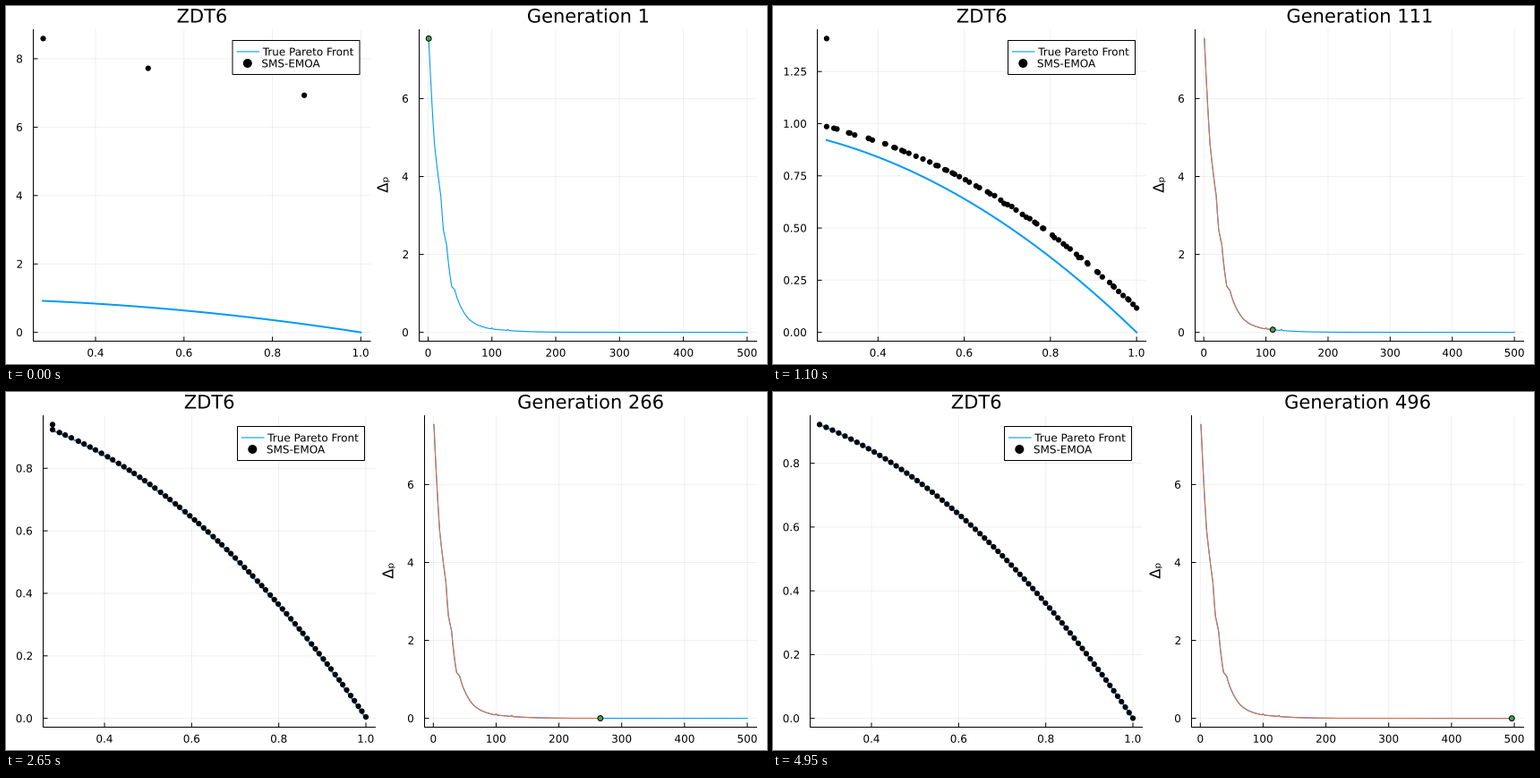
These frames come from a looping animation (850 px wide and 400 px high, 5000 ms). A matplotlib script:

```python
import math

import matplotlib
import matplotlib.pyplot as plt
import numpy as np
from matplotlib.animation import FuncAnimation
from matplotlib.patches import Circle, PathPatch, Rectangle
from matplotlib.textpath import TextPath
from matplotlib.transforms import Affine2D

matplotlib.rcParams["font.family"] = "DejaVu Sans"

W, H, DPI = 850, 400, 100
FRAMES, INTERVAL = 100, 50
PX = 72 / DPI
BLUE, ORANGE, GREEN = "#009AFA", "#E36F47", "#3DA44D"
TOP, BOTTOM, RIGHT = 26.5, 374.5, 838.5
X_MIN = 0.2808

# Panel edges, indexed by the number of decimals in the left tick labels.
LEFT_X0 = [30.5, 41.5, 49.5]
LEFT_X1 = [407, 412.5, 416.5]
RIGHT_X0 = [461.5, 467.5, 471.5]


def indicator_curve():
    """Roughly exponential decay through key points, with two late blips."""
    gen, value = zip((1, 7.54), (10, 4.83), (20, 3.5), (24, 2.63), (29, 2.25),
                     (37, 1.18), (42, 1.08), (46, 0.86), (64, 0.34),
                     (75, 0.21), (98, 0.09), (111, 0.069), (150, 0.025),
                     (216, 0.004), (500, 0.0003))
    curve = np.exp(np.interp(GENS, gen, np.log(value)))
    for blip in (100, 125):
        curve += 0.03 * np.exp(-(GENS - blip) ** 2.0)
    return curve


GENS = np.arange(1, 501)
INDICATOR = indicator_curve()

# A straggler above the front: (first generation, its height).
STRAGGLER = [(1, 0), (51, 1.95), (66, 1.7), (86, 1.5), (101, 1.408),
             (121, 1.05), (151, 0.955), (196, 0.976), (241, 0.94), (281, 0)]


def settled_x(u):
    """Spacing of a converged population: denser where the front is steep."""
    p = 1.44
    a = X_MIN ** p
    return (a + (1 - a) * np.clip(u, 0, 1)) ** (1 / p)


def along(values, n):
    return np.interp(np.linspace(0, 1, n), np.linspace(0, 1, len(values)),
                     values)


# Stages of the population: generation, x, and distance from the front
# relative to the indicator.
RNG = np.random.default_rng(4)
N = 68
U = np.linspace(0, 1, N)
PHASE = RNG.uniform(0, 2 * math.pi, N)
STAGES = [
    (1, [0.2815, 0.519, 0.872], [1.008, 0.896, 0.801]),
    (46, np.append([X_MIN] * 6, along([0.296, 0.574, 0.63, 0.757, 0.903, 1], 12)),
     np.append(np.linspace(1.24, 0.93, 6), [0.89] * 12)),
    (111, np.sort(settled_x(U + RNG.normal(0, 0.006, N))),
     0.87 + 0.16 * np.sin(math.pi * U) + RNG.normal(0, 0.02, N)),
    (216, settled_x(U), np.full(N, 0.9)),
]
CHURN = [0.02, 0.02, 0.003]


def moving_population(gen):
    i = sum(gen >= stage[0] for stage in STAGES[1:-1])
    (g0, x0, r0), (g1, x1, r1) = STAGES[i:i + 2]
    s = (gen - g0) / (g1 - g0)
    n = round(len(x0) + s * (len(x1) - len(x0)))
    rng = np.random.default_rng(gen)
    churn = CHURN[i] * math.sin(math.pi * s)
    x = (1 - s) * along(x0, n) + s * along(x1, n) + rng.normal(0, churn, n)
    r = (1 - s) * along(r0, n) + s * along(r1, n) + rng.normal(0, churn, n)
    return np.sort(np.clip(x, X_MIN, 1)), r


def settled_population(gen):
    wobble = 0.12 * math.exp((216 - gen) / 90) / N * np.sin(gen * 0.11 + PHASE)
    wobble[[0, -1]] = 0
    return settled_x(U + wobble), STAGES[-1][2]


def population(gen):
    x, r = moving_population(gen) if gen < 216 else settled_population(gen)
    g = 1 + r * INDICATOR[gen - 1]
    y = np.sort(g - x * x / g)[::-1]
    height = [h for start, h in STRAGGLER if start <= gen][-1]
    if height > y[0]:
        x, y = np.append(x, X_MIN), np.append(y, height)
    return x, y


def tick_count(top, step):
    return int(1.03 * top / step + 1e-9) + 1


def nice_step(top):
    """Step with the best mix of count, roundness and coverage."""
    best, best_score = 1, -1
    for mag in (0.1, 1):
        for q, nice in ((1, 1), (5, 0.9), (2.5, 0.5), (2, 0.7), (3, 0.2)):
            step = q * mag
            count = tick_count(top, step)
            if not 4 <= count <= 8:
                continue
            score = round(0.25 * (1 - abs(count - 5) / 5) + 0.25 * nice
                          + 0.2 * (count - 1) * step / (1.06 * top), 6)
            if score > best_score:
                best, best_score = step, score
    return best


def decimals(step):
    return next(d for d in range(4) if abs(round(step, d) - step) < 1e-9)


def scale(lo, hi, p0, p1):
    """Map data to pixels with a 3 % margin on both sides."""
    pad = 0.03 * (hi - lo)
    k = (p1 - p0) / (hi - lo + 2 * pad)
    return lambda v: p0 + (np.asarray(v) - lo + pad) * k


fig = plt.figure(figsize=(W / DPI, H / DPI), dpi=DPI, facecolor="white")
ax = fig.add_axes([0, 0, 1, 1])
outlines = {}


def line(x, y, color="black", width=1.0, z=2, **kw):
    ax.plot(x, y, color=color, lw=width * PX, zorder=z, snap=False, **kw)


def glyphs(text, size):
    """Unhinted outline of the text and its horizontal extent."""
    if (text, size) not in outlines:
        path = TextPath((0, 0), text, size=size)
        outlines[text, size] = path, path.get_extents()
    return outlines[text, size]


def add_text(path, move):
    ax.add_artist(PathPatch(path.transformed(move), fc="black", lw=0, zorder=9))


def label(x, y, text, size=12, ha="center"):
    """Text whose capitals are centred on y."""
    path, box = glyphs(text, size)
    anchor = {"left": box.x0, "center": (box.x0 + box.x1) / 2,
              "right": box.x1}[ha]
    add_text(path, Affine2D().translate(-anchor, 0).scale(1, -1)
             .translate(x, y + 0.365 * size))


def upright_label(x, y, text, size):
    path, box = glyphs(text, size)
    add_text(path, Affine2D().translate(-(box.x0 + box.x1) / 2,
                                        -(box.y0 + box.y1) / 2)
             .rotate_deg(90).scale(1, -1).translate(x, y))


def dot(x, y, radius, color="black", edge=0, z=4):
    ax.add_artist(Circle((x, y), radius, fc=color, ec="black", lw=edge * PX,
                         zorder=z))


def panel(x0, x1, title, sx, sy, xticks, yticks, xfmt, yfmt):
    for v in xticks:
        p = float(sx(v))
        line([p, p], [TOP, BOTTOM], z=1, alpha=0.06)
        line([p, p], [BOTTOM, BOTTOM - 4.5])
        label(p, 387.3, xfmt.format(v))
    for v in yticks:
        p = float(sy(v))
        line([x0, x1], [p, p], z=1, alpha=0.06)
        line([x0, x0 + 4.5], [p, p])
        label(x0 - 12.5, p, yfmt.format(v), ha="right")
    line([x0, x0, x1], [TOP, BOTTOM, BOTTOM], solid_joinstyle="miter")
    label((x0 + x1) / 2, 10.8, title, 21)


def legend(right):
    left = right - 142
    ax.add_artist(Rectangle((left, 38.5), 142, 38, fc="white", ec="black",
                            lw=PX, zorder=6, snap=False))
    line([left + 5, left + 29.5], [51, 51], BLUE, 1.1, 7)
    dot(left + 16.8, 64, 5, z=7)
    label(left + 33.7, 51, "True Pareto Front", ha="left")
    label(left + 33.2, 64, "SMS-EMOA", ha="left")


def draw(frame):
    gen = 1 + 5 * frame
    ax.clear()
    ax.set_xlim(0, W)
    ax.set_ylim(H, 0)
    ax.axis("off")

    x, y = population(gen)
    top = max(y.max(), 1 - X_MIN ** 2)
    step = nice_step(top)
    d = decimals(step)

    x0, x1 = LEFT_X0[d], LEFT_X1[d]
    sx, sy = scale(X_MIN, 1, x0, x1), scale(0, top, BOTTOM, TOP)
    panel(x0, x1, "ZDT6", sx, sy, (0.4, 0.6, 0.8, 1.0),
          np.arange(tick_count(top, step)) * step, "{:.1f}", "{:.%df}" % d)
    front = np.linspace(X_MIN, 1, 100)
    line(sx(front), sy(1 - front ** 2), BLUE, 2, 3)
    for px, py in zip(sx(x), sy(y)):
        dot(px, py, 3.1)
    legend(x1 - 12)

    x0 = RIGHT_X0[d]
    sx, sy = scale(1, 500, x0, RIGHT), scale(0, INDICATOR[0], BOTTOM, TOP)
    panel(x0, RIGHT, f"Generation {gen}", sx, sy, range(0, 501, 100),
          range(0, 7, 2), "{}", "{}")
    upright_label(x0 - 40, 200, "Δₚ", 16.5)
    px, py = sx(GENS), sy(INDICATOR)
    line(px, py, BLUE, 1.1, 3)
    line(px[:gen], py[:gen], ORANGE, 1.1, 4)
    dot(px[gen - 1], py[gen - 1], 2.9, GREEN, 1, 5)
    return []


anim = FuncAnimation(fig, draw, frames=FRAMES, interval=INTERVAL,
                     init_func=lambda: [], repeat=True, repeat_delay=0)
plt.show()
```
